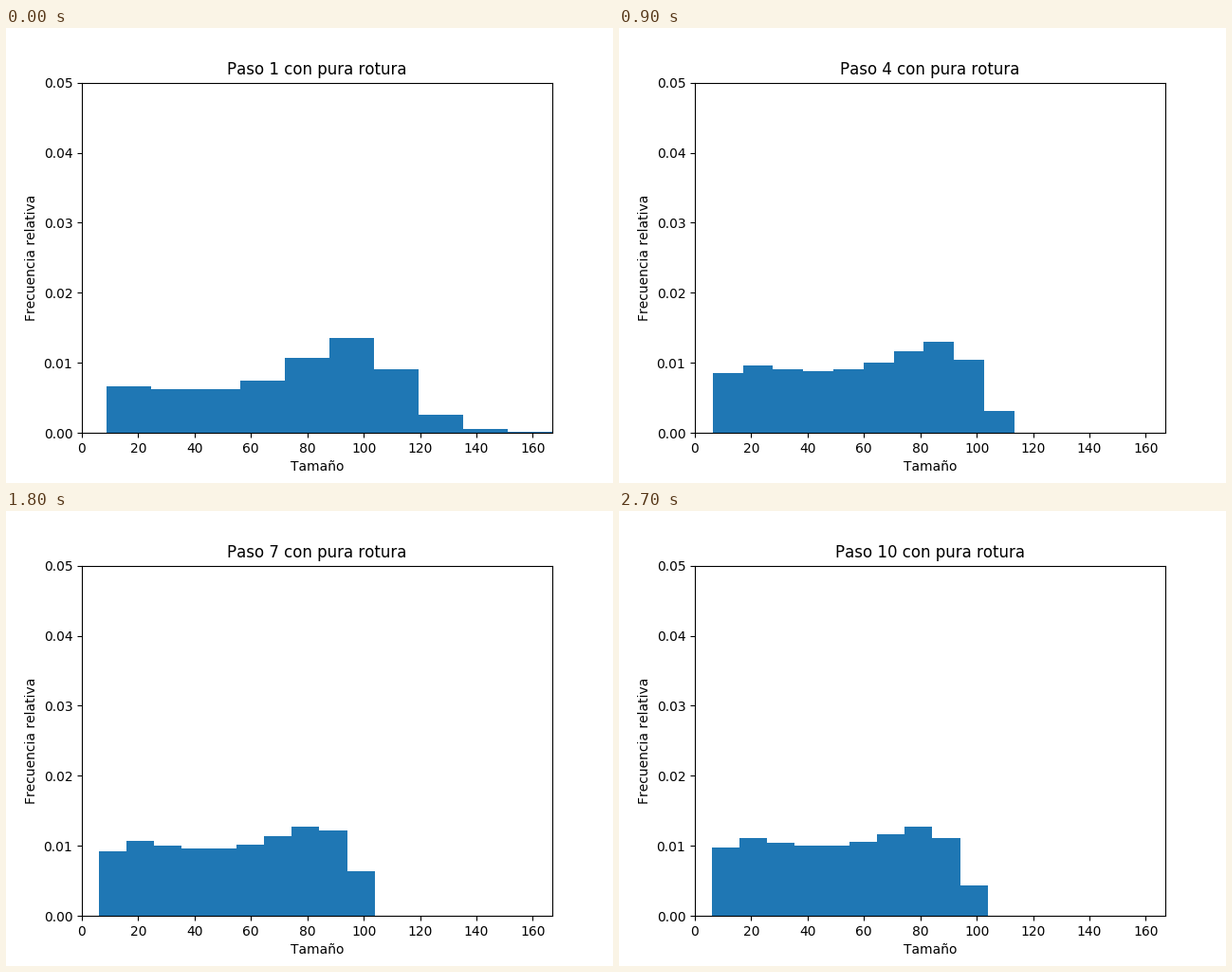
Animation, 640 px wide and 480 px high, one loop 3000 ms. Source, as a matplotlib script:

```python
import numpy as np
import matplotlib.pyplot as plt
from matplotlib.animation import FuncAnimation

plt.rcParams["font.family"] = "DejaVu Sans"
plt.rcParams["text.kerning_factor"] = 6  # whole-pixel letter spacing

STEP_COUNT, STEP_MS, BINS = 10, 300, 10
X_MAX, Y_MAX = 166.9, 0.05

# Initial sizes are normal; larger pieces are more likely to break.
MEAN, SPREAD = 111, 25
CELL = 0.5
SIZES = np.arange(CELL / 2, 230, CELL)
BREAK_CHANCE = 1 / (1 + np.exp(-4 * (SIZES - MEAN) / SPREAD))


def size_range(step):
    """Smallest and largest piece, eased between a few key steps."""
    keys = (1, 2, 4, 6, 7)
    smallest = np.interp(step, keys, (8.8, 7.4, 6.3, 6.1, 5.9))
    largest = np.interp(step, keys, (166.9, 136.4, 113.35, 110.2, 103.85))
    return smallest, largest


def break_pieces(counts, smallest):
    """Split each broken piece in two, slightly favouring uneven splits."""
    broken = counts * BREAK_CHANCE
    part, whole = SIZES[:, None], SIZES[None, :]
    place = (part - smallest) / np.maximum(whole - 2 * smallest, 1)
    inside = (place >= 0) & (place <= 1)
    weight = np.where(inside, 1 + 0.3 * (2 * place - 1) ** 2, 0)
    weight /= np.maximum(weight.sum(axis=0), 1e-9)
    return counts - broken + 2 * weight @ broken


def simulate():
    counts = np.exp(-((SIZES - MEAN) / SPREAD) ** 2 / 2)
    histograms = []
    for step in range(1, STEP_COUNT + 1):
        smallest, largest = size_range(step)
        counts = break_pieces(counts, smallest)
        edges = np.linspace(smallest, largest, BINS + 1)
        in_bins = np.diff(np.interp(edges, SIZES + CELL / 2, np.cumsum(counts)))
        histograms.append((edges, in_bins / in_bins.sum() / np.diff(edges)))
    return histograms


histograms = simulate()
fig, ax = plt.subplots(figsize=(6.4, 4.8), dpi=100)


def draw_step(index):
    edges, density = histograms[index]
    ax.clear()
    ax.bar(edges[:-1], density, width=np.diff(edges), align="edge", color="#1f77b4")
    ax.set_xlim(0, X_MAX)
    ax.set_ylim(0, Y_MAX)
    ax.set_xticks(range(0, 161, 20))
    ax.set_yticks(np.linspace(0, Y_MAX, 6))
    ax.set_xlabel("Tamaño")
    ax.set_ylabel("Frecuencia relativa")
    ax.set_title(f"Paso {index + 1} con pura rotura")
    return []


animation = FuncAnimation(fig, draw_step, frames=STEP_COUNT, interval=STEP_MS,
                          init_func=lambda: draw_step(0), repeat=True, repeat_delay=0)
plt.show()
```
